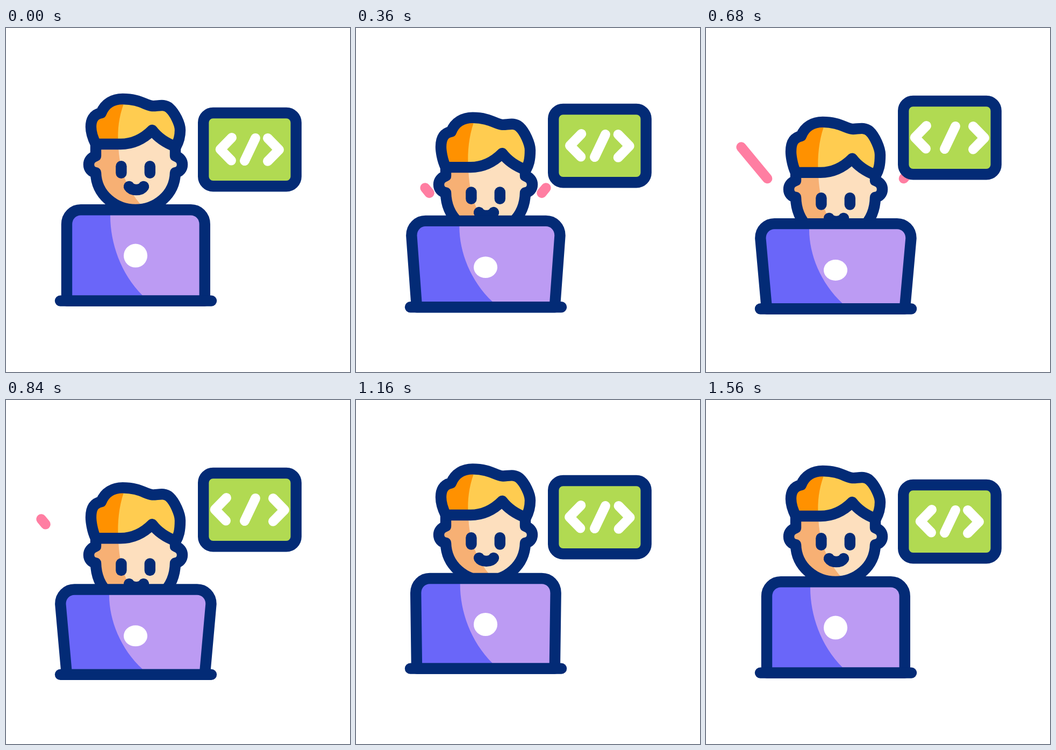
Write an HTML page with a canvas that moves like this. It is 640 px wide and 640 px high and loops after 1840 ms.

```html
<!DOCTYPE html>
<html lang="en">
<head>
<meta charset="utf-8">
<title>Coder at work</title>
<style>
  html, body { margin: 0; width: 100%; height: 100%; overflow: hidden; background: #fff; }
  canvas { display: block; width: 100vw; height: 100vh; }
</style>
</head>
<body>
<canvas id="stage" width="640" height="640"></canvas>
<script>
const ctx = document.getElementById('stage').getContext('2d');
const LOOP = 1840, STEP = 40, MID = 241;
const NAVY = '#032b76', LINE = 20.4;

// Eased progress from 0 to 1 between two times.
function ease(t, from, to) {
  const p = Math.min(1, Math.max(0, (t - from) / (to - from)));
  return p * p * (3 - 2 * p);
}

// Rises, holds, then falls back to 0.
const swing = (t, up, high, down, low) => ease(t, up, high) - ease(t, down, low);

// The laptop sinks, rebounds above its rest position and settles.
const sink = t => 18.6 * ease(t, 80, 560) - 27.5 * ease(t, 560, 1080) + 8.9 * ease(t, 1080, 1480);
const trim = t => ease(t, 280, 665);

function fill(d, color) {
  ctx.fillStyle = color;
  ctx.fill(new Path2D(d));
}

function stroke(d, color = NAVY, width = LINE) {
  ctx.strokeStyle = color;
  ctx.lineWidth = width;
  ctx.stroke(new Path2D(d));
}

// Fills a shape in two tones; the shade path covers its left part.
function twoTone(d, light, shade, dark) {
  fill(d, light);
  ctx.save();
  ctx.clip(new Path2D(d));
  fill(shade, dark);
  ctx.restore();
}

function drawRays(t) {
  const head = trim(t), tail = trim(t - 256);
  if (head - tail < .005) return;
  for (const side of [-1, 1]) {
    const point = p => `${MID + side * (104.5 + 71 * p)} ${307 - 85.5 * p}`;
    stroke(`M${point(tail)} L${point(head)}`, '#ff7ea2', 18.5);
  }
}

function drawHead(drop, lean) {
  // Lower parts of the head move further when it bows.
  const shift = extra => y => y + drop + (28 + extra) * lean;
  const h = shift(0), e = shift(3), f = shift(10), k = shift(16);

  // Left half of the face as distances from the middle, mirrored for the right.
  const half = [
    [74, f(216)], [74, e(238)],
    [83, e(241)], [87, e(247)], [87, e(254)],
    [87, e(262)], [82, e(268)], [74, e(269)],
    [73, f(311)], [37, f(338)]
  ];
  const left = half.map(([x, y]) => `${MID - x} ${y}`);
  const right = half.map(([x, y]) => `${MID + x} ${y}`).reverse();
  const [start, temple, ...rest] = left;
  const face = `M${start} L${temple} C${rest.join(' ')} ${MID} ${f(338)}
    ${right.slice(0, -1).join(' ')} L${right.at(-1)}`;
  const shade = `M140 ${f(180)} H209 V${f(216)} C210 ${k(262)} 225 ${k(305)} 262 ${k(340)} H140 Z`;
  twoTone(`${face} V${f(190)} H167 Z`, '#fddfbe', shade, '#f7b074');
  stroke(face);

  for (const x of [214.4, 267.8]) stroke(`M${x} ${k(257.3)} V${k(269.7)}`);
  stroke(`M229 ${k(295)} C234 ${k(303)} 251 ${k(303)} 256 ${k(295)}`);

  const hair = `M167 ${f(216)} C160 ${f(202)} 158 ${e(190)} 158 ${e(184)}
    C158 ${h(172)} 162 ${h(161)} 177 ${h(158)} C184 ${h(140)} 200 ${h(132)} 217 ${h(132)}
    C248 ${h(132)} 260 ${h(144)} 272 ${h(145)} C281 ${h(146)} 294 ${h(140)} 304 ${h(149)}
    C314 ${h(158)} 324 ${e(178)} 324 ${e(190)} C324 ${f(203)} 321 ${f(212)} 316 ${f(221)}
    C300 ${f(215)} 284 ${f(206)} 272 ${f(190)} C258 ${f(204)} 240 ${f(216)} 213 ${f(216)} Z`;
  const hairShade = `M140 ${h(130)} H223 C209 ${h(165)} 207 ${f(190)} 209 ${f(222)} H140 Z`;
  twoTone(hair, '#ffcc50', hairShade, '#ff9100');
  stroke(hair);
}

function drawLaptop(drop, lean) {
  const base = 507.6 + drop, top = base - 169.4 + 11 * lean;
  const l = 113 - 11.7 * lean, r = 369.8 + 11.7 * lean;
  const lid = `M113 ${base} L${l} ${top + 27} C${l} ${top + 11} ${l + 12} ${top} ${l + 26} ${top}
    H${r - 26} C${r - 12} ${top} ${r} ${top + 11} ${r} ${top + 27} L369.8 ${base} Z`;
  const up = v => base - v * (1 - .06 * lean);
  const x = 194 - 2 * lean;
  const shade = `M80 ${top - 5} H${x} V${top + 11} C${x} ${up(108)} 213 ${up(51)} 254 ${base - 10} H80 Z`;
  twoTone(lid, '#bc9bf3', shade, '#6a66f9');
  stroke(lid);
  stroke(`M101 ${base} H382`);

  ctx.fillStyle = '#fff';
  ctx.beginPath();
  ctx.ellipse(MID, base - 84 + 12 * lean, 22, 22 - 2.5 * lean, 0, 0, 2 * Math.PI);
  ctx.fill();
}

function drawScreen(rise, spread) {
  ctx.save();
  ctx.translate(0, rise);
  const frame = new Path2D();
  frame.roundRect(367.2, 158, 172.5, 136.2, 18);
  ctx.fillStyle = '#b1da52';
  ctx.fill(frame);
  ctx.strokeStyle = NAVY;
  ctx.lineWidth = LINE;
  ctx.stroke(frame);
  stroke(`M${420 - spread} 204 l-21.3 21.8 l20.3 20.7`, '#fff', 18);
  stroke('M464 205 L444 247', '#fff', 18);
  stroke(`M${487 + spread} 205 l21 21.5 l-21 21.3`, '#fff', 18);
  ctx.restore();
}

function draw(t) {
  const drop = sink(t), lean = swing(t, 80, 460, 920, 1240);
  ctx.fillStyle = '#fff';
  ctx.fillRect(0, 0, 640, 640);
  ctx.lineCap = ctx.lineJoin = 'round';
  drawRays(t);
  drawHead(drop, lean);
  drawLaptop(drop, lean);
  drawScreen(-22 * swing(t, 180, 660, 840, 1380), 10 * swing(t, 300, 670, 840, 1270));
}

const start = performance.now();
function tick() {
  const t = (performance.now() - start) % LOOP;
  draw(Math.floor(t / STEP) * STEP);
  requestAnimationFrame(tick);
}
tick();
</script>
</body>
</html>
```
